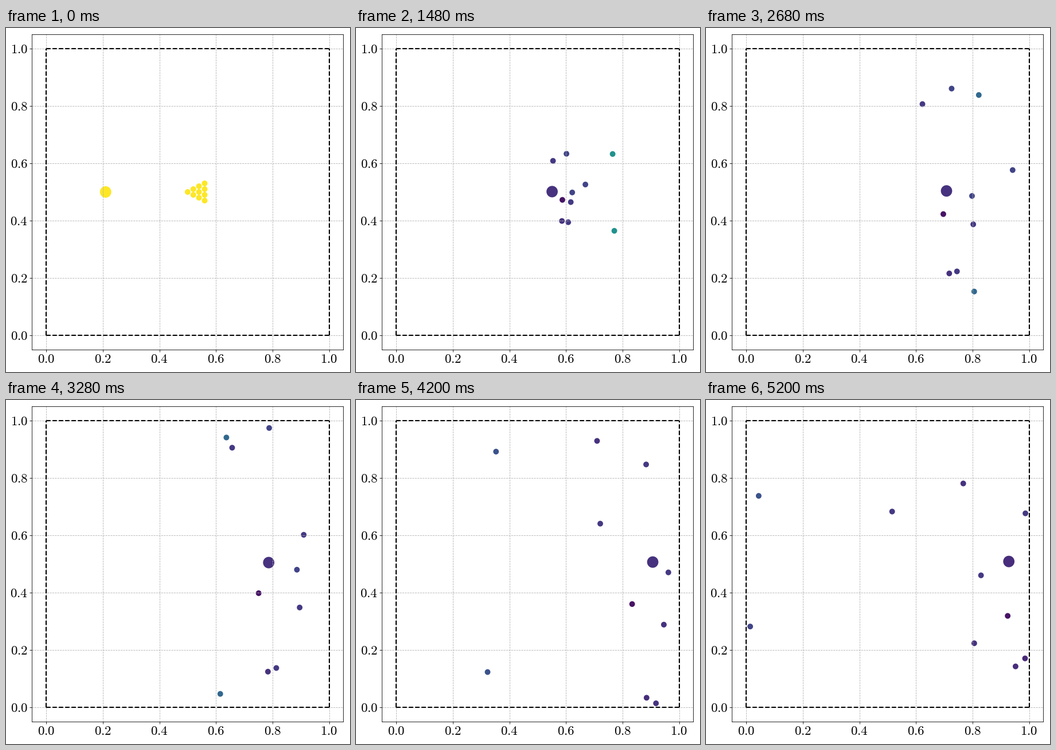
Recreate the animation shown at these times as a matplotlib script. Size 600 by 600 pixels, loop 5.24 s.

```python
import numpy as np
import matplotlib.pyplot as plt
from matplotlib.animation import FuncAnimation
from matplotlib.patches import Circle

plt.rcParams.update({"mathtext.fontset": "cm", "font.family": "Liberation Serif"})

FRAMES, INTERVAL = 131, 40
SIZE = 600
LEFT, BASE, SX, SY = 70.1, 536, 493.5, 500   # the unit square in stage pixels
KEEP = 0.9                                   # speed kept after a cushion
STRIKE, SPREAD = 21.5, 22.06                 # cue touches the rack, rack opens
SETTLE, MELEE = 4.3, 4                       # frames of jostling after the break


def bounce(p, v, r, t):
    """Move along one axis between two cushions; return position and hits."""
    n = 0
    while True:
        dt = ((1 - r if v > 0 else r) - p) / v
        if dt >= t:
            return p + v * t, n
        p, v, t, n = p + v * dt, -KEEP * v, t - dt, n + 1


class Ball:
    """Leaves `rest` at frame `start`; `vel` and `nudge` are in thousandths."""

    def __init__(self, rest, vel, hits, nudge=(0, 0), start=SPREAD, r=0.01):
        self.rest = np.array(rest)
        self.vel, self.nudge = np.array(vel) / 1000, np.array(nudge) / 1000
        self.hits, self.start, self.r = hits, start, r
        self.patch = Circle(rest, r, lw=0)

    def before(self, t):
        return self.rest

    def state(self, frame):
        t = frame - self.start
        if t <= 0:
            return self.before(t), 0
        origin = self.rest + self.nudge * (1 - np.exp(-t / SETTLE))
        (x, nx), (y, ny) = (bounce(p, v, self.r, t) for p, v in zip(origin, self.vel))
        knocks = max(1, round(self.hits * min(1, t / MELEE)))
        return (x, y), knocks + nx + ny


class Cue(Ball):
    def before(self, t):
        return self.rest + (0.26 * t / STRIKE, 0)


# Velocity, collisions in the break and drift, row by row from the apex.
scatter = [
    ((3.61, -1.65), 20, (34.5, -3)),
    ((2.29, 6.60), 5),
    ((4.40, -6.10), 6),
    ((4.14, 7.58), 4),
    ((5.87, -0.41), 4, (-5.7, 4.6)),
    ((4.56, -5.72), 5),
    ((13.72, 6.86), 1),
    ((9.13, 1.69), 4, (-28.6, -9.5)),
    ((6.22, -2.60), 5, (-37, 14)),
    ((14.12, -7.06), 1),
]
rack = [(0.5 + 0.02 * i, 0.5 + 0.01 * i - 0.02 * j)
        for i in range(4) for j in range(i + 1)]
balls = [Cue((0.47, 0.5), (5.23, 0.08), 6, start=STRIKE, r=0.02)]
balls += [Ball(spot, *go) for spot, go in zip(rack, scatter)]

fig = plt.figure(figsize=(8, 8), dpi=75)
ax = fig.add_axes([(LEFT - 0.05 * SX) / SIZE, 1 - (BASE + 0.05 * SY) / SIZE,
                   1.1 * SX / SIZE, 1.1 * SY / SIZE])
ax.set(xlim=(-0.05, 1.05), ylim=(-0.05, 1.05))
ticks = np.linspace(0, 1, 6)
labels = [f"${v:.1f}$" for v in ticks]
ax.set_xticks(ticks, labels)
ax.set_yticks(ticks, labels)
ax.tick_params(labelsize=22)
ax.grid(ls="--")
for side in (0, 1):
    ax.plot([0, 1], [side, side], "k--", lw=2)
    ax.plot([side, side], [0, 1], "k--", lw=2)
for b in balls:
    ax.add_patch(b.patch)


def draw(frame):
    for b in balls:
        b.patch.center, hits = b.state(frame)
        b.patch.set_facecolor(plt.cm.viridis(1 / (1 + hits)))
    return [b.patch for b in balls]


anim = FuncAnimation(fig, draw, frames=FRAMES, interval=INTERVAL,
                     repeat=True, repeat_delay=0)
plt.show()
```
